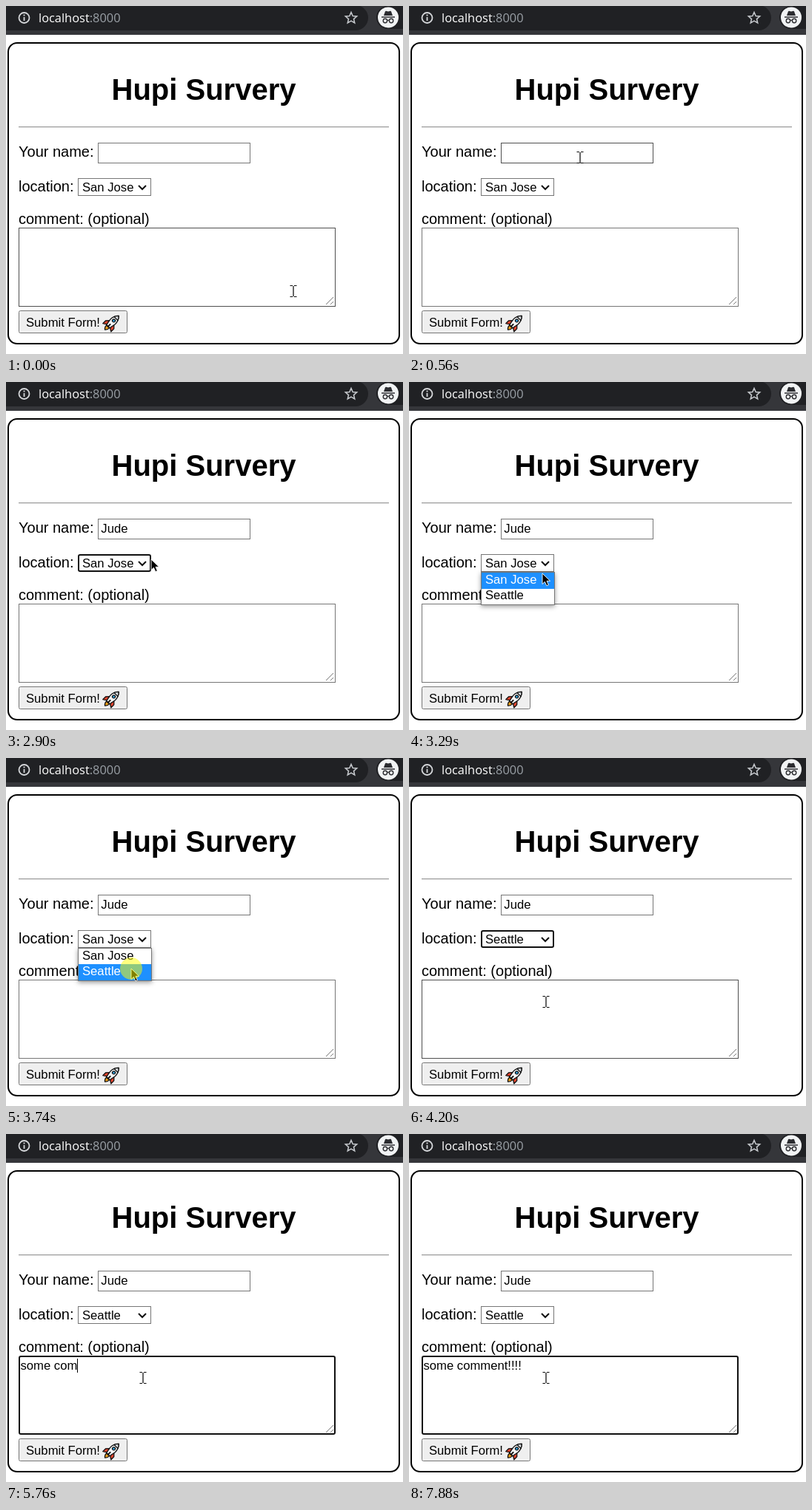
Recreate the animation shown at these times as an HTML page. Size 536 by 471 pixels, loop 8000 ms.

```html
<!DOCTYPE html>
<html lang="en">
<head>
<meta charset="utf-8">
<title>Survey form</title>
<style>
  html, body { margin: 0; width: 100%; height: 100%; overflow: hidden; background: #fff; }
  svg { display: block; font-family: "Liberation Sans", Arial, sans-serif; }
  text { white-space: pre; }
  .label { font-size: 20px; }
  .field { font-size: 16.667px; }
  .url { font: 16.4px "Open Sans", "Noto Sans", sans-serif; }
  .box { fill: #fff; stroke: #767676; }
  .box.hover { stroke: #4f4f4f; }
  .box.focus { stroke: #101010; stroke-width: 2; }
</style>
</head>
<body>
<svg width="536" height="471" viewBox="0 0 536 471">
  <defs>
    <filter id="shadow" x="-20%" y="-30%" width="140%" height="170%">
      <feDropShadow dx="0" dy="2" stdDeviation="3" flood-opacity=".4"/>
    </filter>
  </defs>

  <!-- browser bar -->
  <rect width="536" height="39" fill="#35363a"/>
  <rect x="-30" y="-1" width="519" height="34" rx="17" fill="#202124"/>
  <g fill="none" stroke="#d5d7da" stroke-width="1.8">
    <circle cx="24.5" cy="16" r="7"/>
    <path d="M24.5 15v5M24.5 11.6v1.9"/>
    <path d="M466 8.5l2.2 5 5.4.5-4.1 3.6 1.2 5.3-4.7-2.8-4.7 2.8 1.2-5.3-4.1-3.6 5.4-.5z" stroke="#c4c7cb" stroke-width="1.6"/>
  </g>
  <text class="url" x="44" y="22" fill="#fff">localhost<tspan fill="#9aa0a6">:8000</tspan></text>
  <rect x="500" y="0" width="60" height="31" rx="15.5" fill="#202124"/>
  <circle cx="516" cy="15.5" r="14" fill="#f1f3f4"/>
  <path d="M507 14.2h18v1.5h-18zM510 13l1.9-5.6q.4-.9 1.4-.6l2.7.7 2.7-.7q1-.3 1.4.6L522 13z" fill="#2b2c30"/>
  <g fill="none" stroke="#2b2c30" stroke-width="1.4">
    <circle cx="511.9" cy="20" r="2.7"/>
    <circle cx="520.1" cy="20" r="2.7"/>
    <path d="M514.6 19.6q1.4-.9 2.8 0"/>
  </g>

  <!-- card -->
  <rect x="3" y="50" width="528" height="407" rx="12" fill="#fff" stroke="#000" stroke-width="2"/>
  <text x="267" y="127" text-anchor="middle" font-size="40" font-weight="bold">Hupi Survery</text>
  <path d="M17 163.5h500" stroke="#9a9a9a"/>
  <path d="M17 164.5h500" stroke="#e6e6e6"/>

  <g class="label">
    <text x="17" y="204">Your name:</text>
    <text x="17" y="251">location:</text>
    <text x="17" y="295">comment: (optional)</text>
  </g>

  <rect id="nameBox"/>
  <rect id="placeBox"/>
  <rect id="noteBox"/>
  <path d="M432 404l10-10M438 404l4-4" stroke="#777"/>
  <path d="M179 243l5 5 5-5" fill="none" stroke="#101010" stroke-width="2"/>
  <g class="field">
    <text id="name" x="128.3" y="204"></text>
    <text id="place" x="103" y="251"></text>
    <text id="note" x="19.5" y="319"></text>
  </g>
  <rect id="caret" width="1" height="19"/>

  <!-- button -->
  <rect x="17.5" y="412.5" width="146" height="30" rx="2" fill="#efefef" stroke="#767676"/>
  <text class="field" x="27" y="434">Submit Form!</text>
  <g transform="translate(143 428.5) rotate(45)" stroke="#111" stroke-width="1.3" stroke-linejoin="round">
    <path d="M-2.6 7.5Q-3 11 0 13.5 3 11 2.6 7.5z" fill="#f7a21b"/>
    <path d="M-4 0l-3.8 4v5.5L-3 6.5zM4 0l3.8 4v5.5L3 6.5z" fill="#e0452f"/>
    <path d="M0-13Q-5-8-4.6-1.5L-3 7.2h6L4.6-1.5Q5-8 0-13z" fill="#f4f4f4"/>
    <path d="M0-13q-2.6 2.6-3.6 5.3h7.2Q2.6-10.4 0-13z" fill="#d9dde0"/>
    <circle cy="-3.6" r="2" fill="#35a9e8"/>
    <path d="M0 2.5v6" stroke-width="1.8"/>
  </g>

  <!-- open list -->
  <g id="list">
    <rect x="97.5" y="257.5" width="99" height="44" fill="#fff" stroke="#767676" filter="url(#shadow)"/>
    <rect id="pick" x="98" width="98" height="22" fill="#1e90ff"/>
    <g class="field">
      <text id="first" x="103" y="273">San Jose</text>
      <text id="second" x="103" y="294">Seattle</text>
    </g>
  </g>

  <g id="pointer">
    <path id="arrow" d="M0 0v14.5l3.4-3.2 2.4 5.4 2.6-1.1-2.4-5.3h4.6z" fill="#000" stroke="#fff" stroke-width=".9"/>
    <path id="beam" d="M-4.5-7.5h3.5M1-7.5h3.5M-4.5 7.5h3.5M1 7.5h3.5M0-7v14" fill="none" stroke="#000" stroke-width="1.2"/>
    <circle id="press" r="15" fill="#ff0" fill-opacity=".5"/>
  </g>
</svg>
<script>
const LOOP = 8000;
const $ = id => document.getElementById(id);

const fields = {
  name: { x: 124, y: 185, w: 206, h: 28 },
  place: { x: 97, y: 233, w: 99, h: 24 },
  note: { x: 17, y: 300, w: 428, h: 107 }
};

// start, step length, step count, end point
const start = { x: 388, y: 386 };
const moves = [
  [70, 72, 8, 224, 197],
  [2730, 80, 3, 196, 240],
  [2970, 78, 2, 186, 245],
  [3200, 78, 5, 169, 285],
  [3820, 76, 6, 185, 330]
];
const presses = [[646, 720], [3046, 3124], [3664, 3816], [4274, 4350]];
const caretOff = [[1170, 1550], [2410, 2580], [4830, 4910], [7880, LOOP]];

// time, letters shown
const nameKeys = [[1550, 1], [1780, 3], [1870, 4]];
const noteKeys = [
  [4910, 1], [5060, 2], [5130, 3], [5200, 4], [5270, 5], [5520, 7], [5760, 8],
  [5920, 9], [6160, 10], [6320, 11], [6400, 12], [6930, 13], [7100, 14], [7250, 15], [7330, 16]
];

const within = (t, spans) => spans.some(([a, b]) => t >= a && t < b);
const typed = (t, keys, text) =>
  text.slice(0, keys.reduce((n, [at, count]) => t >= at ? count : n, 0));
const show = (id, on) => $(id).setAttribute('visibility', on ? 'visible' : 'hidden');
const set = (id, attrs) => {
  for (const key in attrs) $(id).setAttribute(key, attrs[key]);
};
const inside = (p, f) => p.x >= f.x && p.x < f.x + f.w && p.y >= f.y && p.y < f.y + f.h;

function pointerAt(t) {
  let { x, y } = start;
  for (const [from, step, count, toX, toY] of moves) {
    if (t < from) break;
    const p = Math.min(1, (Math.floor((t - from) / step) + 1) / count);
    const k = p * p * (3 - 2 * p);
    x += (toX - x) * k;
    y += (toY - y) * k;
  }
  return { x: Math.round(x), y: Math.round(y) };
}

function focusAt(t) {
  if (t < 646) return '';
  if (t < 2580) return 'name';
  if (t < 3046) return 'place';
  if (t < 3816) return '';
  return t < 4274 ? 'place' : 'note';
}

function drawBox(id, focused, hovered) {
  const { x, y, w, h } = fields[id];
  const edge = focused ? 2 : 1;
  set(id + 'Box', {
    class: 'box' + (focused ? ' focus' : hovered ? ' hover' : ''),
    x: x + edge / 2, y: y + edge / 2, width: w - edge, height: h - edge,
    rx: focused ? 2 : 0
  });
}

function draw(t) {
  const p = pointerAt(t);
  const focus = focusAt(t);
  const open = t >= 3046 && t < 3816;

  $('name').textContent = typed(t, nameKeys, 'Jude');
  $('note').textContent = typed(t, noteKeys, 'some comment!!!!');
  $('place').textContent = t < 3816 ? 'San Jose' : 'Seattle';
  for (const id in fields) drawBox(id, focus === id, !open && inside(p, fields[id]));

  const writing = focus === 'name' || focus === 'note';
  show('caret', writing && !within(t, caretOff));
  if (writing) {
    const left = +$(focus).getAttribute('x');
    const end = left + $(focus).getComputedTextLength();
    set('caret', { x: Math.max(Math.ceil(left), Math.floor(end)), y: fields[focus].y + 4 });
  }

  show('list', open);
  const second = p.y >= 279;
  set('pick', { y: second ? 279 : 258 });
  set('first', { fill: second ? '#000' : '#fff' });
  set('second', { fill: second ? '#fff' : '#000' });

  const overText = !open && (inside(p, fields.name) || inside(p, fields.note));
  set('pointer', { transform: `translate(${p.x} ${p.y})` });
  show('beam', overText);
  show('arrow', !overText);
  show('press', within(t, presses));
}

const began = performance.now();
function tick() {
  draw((performance.now() - began) % LOOP);
  requestAnimationFrame(tick);
}
tick();
</script>
</body>
</html>
```
